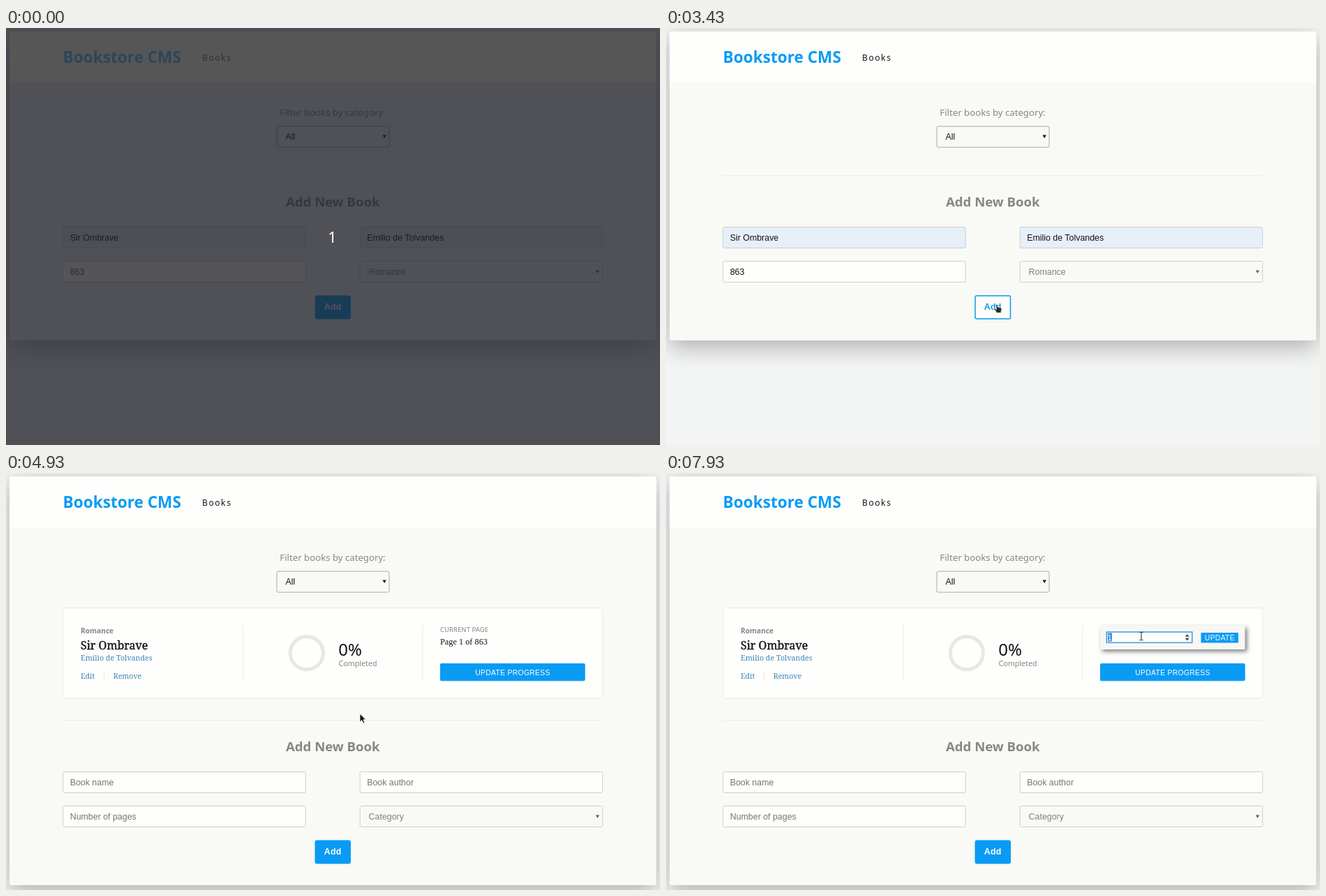
Animation, 937 px wide and 598 px high, one loop 8 s. Source, as an HTML page:

```html
<!DOCTYPE html>
<html lang="en">
<head>
<meta charset="utf-8">
<title>Bookstore CMS</title>
<style>
  html, body { margin: 0; width: 100%; height: 100%; overflow: hidden; background: #f3f4f4; }
  svg { display: block; width: 937px; height: 598px; }
  text { white-space: pre; }
  .ui { font-family: "Noto Sans", "Open Sans", sans-serif; }
  .form { font-family: "Liberation Sans", Arial, sans-serif; }
  .slab { font-family: "Noto Serif", serif; }
  .times { font-family: "Liberation Serif", "Times New Roman", serif; }
  .bold { font-weight: 700; }
  .mid { text-anchor: middle; }
  .soft { filter: blur(17px); }
  .lift { filter: blur(3px); }
</style>
</head>
<body>
<svg id="stage" viewBox="0 0 937 598" xmlns="http://www.w3.org/2000/svg"></svg>
<script>
const LOOP = 8000;
const BLUE = [10, 155, 245], WHITE = [254, 254, 252];
const PAPER = '#fefefc', BODY = '#f9f9f6', ACCENT = '#0a9bf5', LINK = '#3a84b8', GREY = '#868686';
const TITLE = 'Sir Ombrave', AUTHOR = 'Emilio de Tolvandes';

// Times of the main events
const LIGHT = 30, SHOW_CURSOR = 700, ADD_HOVER = 1880, ADDED = 3470, CARD_IN = 600,
      UPDATE_HOVER = 6010, POPUP = 6570, UPDATE_LEAVE = 6820, FOCUS = 7200, SELECT = 7830;

const PATH = [
  [700, 659, 583], [850, 695, 548], [1100, 590, 468], [1380, 364, 386], [1500, 370, 388],
  [1650, 378, 375], [1950, 455, 392], [2200, 473, 397], [2790, 473, 397], [2800, 474, 396],
  [3460, 474, 396], [3470, 472, 398], [4330, 472, 398], [4450, 440, 382], [4600, 387, 345],
  [4760, 440, 302], [4930, 507, 345], [5430, 507, 345], [5620, 540, 374], [5980, 645, 298],
  [6130, 654, 293], [6450, 654, 293], [6820, 678, 272], [7030, 684, 246], [7090, 684, 246],
  [7200, 681, 234]
];
const SHAPES = [[0, 'arrow'], [1960, 'hand'], [ADDED, 'beam'], [4380, 'arrow'],
                [6000, 'hand'], [UPDATE_LEAVE, 'arrow'], [6950, 'beam']];

const rect = (x, y, w, h, fill, more = '') =>
  `<rect x="${x}" y="${y}" width="${w}" height="${h}" fill="${fill}" ${more}/>`;
const text = (x, y, size, str, cls, fill, more = '') =>
  `<text x="${x}" y="${y}" font-size="${size}" class="${cls}" fill="${fill}" ${more}>${str}</text>`;
const line = (x1, y1, x2, y2, color = '#e9e9e7') =>
  `<path d="M${x1} ${y1}L${x2} ${y2}" stroke="${color}"/>`;
const caret = (x, y, fill) => `<path d="M${x - 2.7} ${y - 2}h5.4l-2.7 4.6z" fill="${fill}"/>`;
const group = (id, inner, more = '') => `<g id="${id}" ${more}>${inner}</g>`;

const field = (x, y, str, fill, color) =>
  rect(x, y, 347.5, 30, fill, 'rx="2" stroke="#cdcecd"') + text(x + 10, y + 19, 12.4, str, 'form', color);
const category = str =>
  rect(507.2, 334.5, 347.5, 30, BODY, 'rx="2" stroke="#cdcecd"') +
  text(519.6, 353.5, 12.4, str, 'form', '#808080') + caret(847.5, 349.5, '#666');
const fields = (name, author, pages, kind, fill, color) =>
  field(81.7, 285.5, name, fill, color) + field(507.2, 285.5, author, fill, color) +
  field(81.7, 334.5, pages, PAPER, color) + category(kind);
const button = (id, x, y, w, h, rx, label) =>
  group(id, rect(x, y, w, h, ACCENT, `rx="${rx}" stroke="${ACCENT}"`) + label);

const page = group('page',
  rect(5, 14, 926.5, 443, '#000', 'id="shadow" class="soft" opacity=".29"') +
  rect(5, 5, 926.5, 443, BODY, 'id="sheet" rx="3"') +
  rect(5, 5, 926.5, 73.5, PAPER, 'rx="2"') +
  text(81.5, 50, 22.6, 'Bookstore CMS', 'ui bold', ACCENT) +
  text(281, 47, 12, 'Books', 'ui', '#161616', 'letter-spacing="1.6"') +
  text(468, 126, 13.2, 'Filter books by category:', 'ui mid', GREY) +
  rect(388, 141, 161, 30, BODY, 'rx="2" stroke="#aaa"') +
  text(400.5, 160, 12.4, 'All', 'form', '#111') + caret(542.2, 155.5, '#111'));

const form = group('form',
  `<g id="divider">${line(81.5, 211.7, 855, 211.7, '#ececea')}</g>` +
  text(468.3, 256, 18.6, 'Add New Book', 'ui bold mid', GREY) +
  group('filled', fields(TITLE, AUTHOR, '863', 'Romance', '#e6f0f8', '#111')) +
  group('empty', fields('Book name', 'Book author', 'Number of pages', 'Category', PAPER, '#757575')) +
  button('add', 443, 384, 50.5, 33, 2,
    text(468.2, 404.3, 12.4, 'Add', 'form bold mid', PAPER, 'letter-spacing=".2"')));

const popup = group('popup',
  rect(625, 222, 207.5, 34, '#000', 'class="lift" opacity=".5"') +
  rect(622, 218.5, 207.5, 34.5, '#f7f7f5', 'rx="1"') +
  rect(631.3, 228, 122.5, 15.3, PAPER, 'id="number" stroke="#909090"') +
  rect(633, 229.5, 6, 12, '#3b8fdc', 'id="selection"') +
  text(632.8, 240, 10.6, '1', 'form', '#111', 'id="value"') +
  '<path d="M743.7 234.8l3-3.6 3 3.6zM743.7 236.8l3 3.6 3-3.6z" fill="#444"/>' +
  rect(766.5, 229, 53.5, 14.5, ACCENT) +
  text(793.4, 240.3, 10.3, 'UPDATE', 'form mid', PAPER, 'letter-spacing=".35"'));

const card = group('card',
  rect(81.7, 193.5, 773, 129.5, PAPER, 'rx="3" stroke="#e8e8e6"') +
  text(107, 229.8, 10.2, 'Romance', 'ui bold', GREY) +
  text(107, 252.5, 16, TITLE, 'slab', '#121212', 'stroke="#121212" stroke-width=".4"') +
  text(107, 269, 10.7, AUTHOR, 'slab', LINK) +
  text(107, 295, 10.6, 'Edit', 'slab', LINK) +
  line(140.5, 285, 140.5, 298) +
  text(153.7, 295, 10.6, 'Remove', 'slab', LINK) +
  line(339.5, 218, 339.5, 298) + line(596.8, 218, 596.8, 298) +
  '<circle cx="430.9" cy="258.2" r="23.6" fill="none" stroke="#e7e7e5" stroke-width="5"/>' +
  text(476.3, 261.5, 24, '0%', 'ui', '#121212') +
  text(476.5, 276.7, 10.7, 'Completed', 'ui', GREY) +
  text(622, 227.6, 9.6, 'CURRENT PAGE', 'ui', GREY) +
  text(622, 245.8, 12.3, 'Page 1 of 863', 'times', '#121212') +
  button('update', 622.4, 273.4, 206.8, 24.4, 1.5,
    text(726, 289.5, 10.3, 'UPDATE PROGRESS', 'form mid', PAPER, 'letter-spacing=".35"')) +
  popup);

const cursors = group('cursor',
  '<path id="arrow" d="M0 0V12.2L2.8 9.6 4.8 14 6.8 13 4.9 8.8H8.4Z" fill="#161616" stroke="#fff" stroke-width=".8"/>' +
  '<path id="hand" d="M-1.5 1Q-.4-.6.6 1L1.4 4 6 5.2Q7.2 5.6 7 7.6L6.2 10.4V12.6H-.8V11L-4 7.4Q-4 5.8-2.4 6.4L-.7 7.6Z" fill="#2c2c2c" stroke="#fff" stroke-width=".8"/>' +
  '<path id="beam" d="M-2.6-5.7H-.8L0-5 .8-5.7H2.6M0-5V5M-2.6 5.7H-.8L0 5 .8 5.7H2.6" fill="none" stroke="#222"/>');

const dim = group('dim',
  rect(0, 0, 937, 598, 'rgb(29,32,40)', 'opacity=".77"') +
  rect(5, 5, 926.5, 73.5, '#605c55', 'opacity=".3"') +
  rect(81.7, 334.5, 347.5, 30, '#605c55', 'opacity=".25"') +
  text(467.5, 307.5, 22, '1', 'ui mid', '#fffff4'));

document.getElementById('stage').innerHTML = page + form + card + cursors + dim;

const $ = id => document.getElementById(id);
const show = (id, on) => $(id).setAttribute('display', on ? 'inline' : 'none');
const clamp = v => Math.max(0, Math.min(1, v));
const span = (t, start, length) => clamp((t - start) / length);
const ease = p => p * p * (3 - 2 * p);
const mix = (a, b, p) => `rgb(${a.map((v, i) => Math.round(v + (b[i] - v) * p))})`;

function position(t) {
  const i = PATH.findIndex(p => p[0] > t);
  if (i < 0) return PATH[PATH.length - 1].slice(1);
  if (i === 0) return PATH[0].slice(1);
  const [t0, x0, y0] = PATH[i - 1], [t1, x1, y1] = PATH[i];
  const p = (t - t0) / (t1 - t0);
  return [x0 + (x1 - x0) * p, y0 + (y1 - y0) * p];
}

function paintButton(id, hover) {
  const [box, label] = $(id).children;
  box.setAttribute('fill', mix(BLUE, WHITE, hover));
  box.setAttribute('stroke-width', 1 + hover * 0.5);
  label.setAttribute('fill', mix(WHITE, BLUE, hover));
}

function render(t) {
  const added = t >= ADDED;
  const shift = added ? 143 : 0;
  $('form').setAttribute('transform', `translate(0 ${shift})`);
  $('sheet').setAttribute('height', 443 + shift);
  $('shadow').setAttribute('height', 443 + shift);
  show('divider', t >= LIGHT);
  show('filled', !added);
  show('empty', added);
  paintButton('add', ease(span(t, ADD_HOVER, 300)) - ease(span(t, ADDED, 300)));

  const entry = span(t, ADDED, CARD_IN);
  show('card', added);
  $('card').setAttribute('opacity', entry);
  $('card').setAttribute('transform',
    `translate(468.2 258.2) scale(${1.2 - 0.2 * entry}) translate(-468.2 -258.2)`);
  paintButton('update', ease(span(t, UPDATE_HOVER, 250)) - ease(span(t, UPDATE_LEAVE, 270)));

  const focused = t >= FOCUS, selected = t >= SELECT;
  show('popup', t >= POPUP);
  $('number').setAttribute('stroke', focused ? '#4a9fe0' : '#909090');
  $('number').setAttribute('stroke-width', focused ? 1.6 : 1);
  show('selection', selected);
  $('value').setAttribute('fill', selected ? '#fff' : '#111');

  const shape = SHAPES.filter(s => t >= s[0]).pop()[1];
  for (const id of ['arrow', 'hand', 'beam']) show(id, id === shape);
  show('cursor', t >= SHOW_CURSOR);
  $('cursor').setAttribute('transform', `translate(${position(t)})`);
  show('dim', t < LIGHT);
}

const start = performance.now();
function tick() {
  render((performance.now() - start) % LOOP);
  requestAnimationFrame(tick);
}
render(0);
requestAnimationFrame(tick);
</script>
</body>
</html>
```
